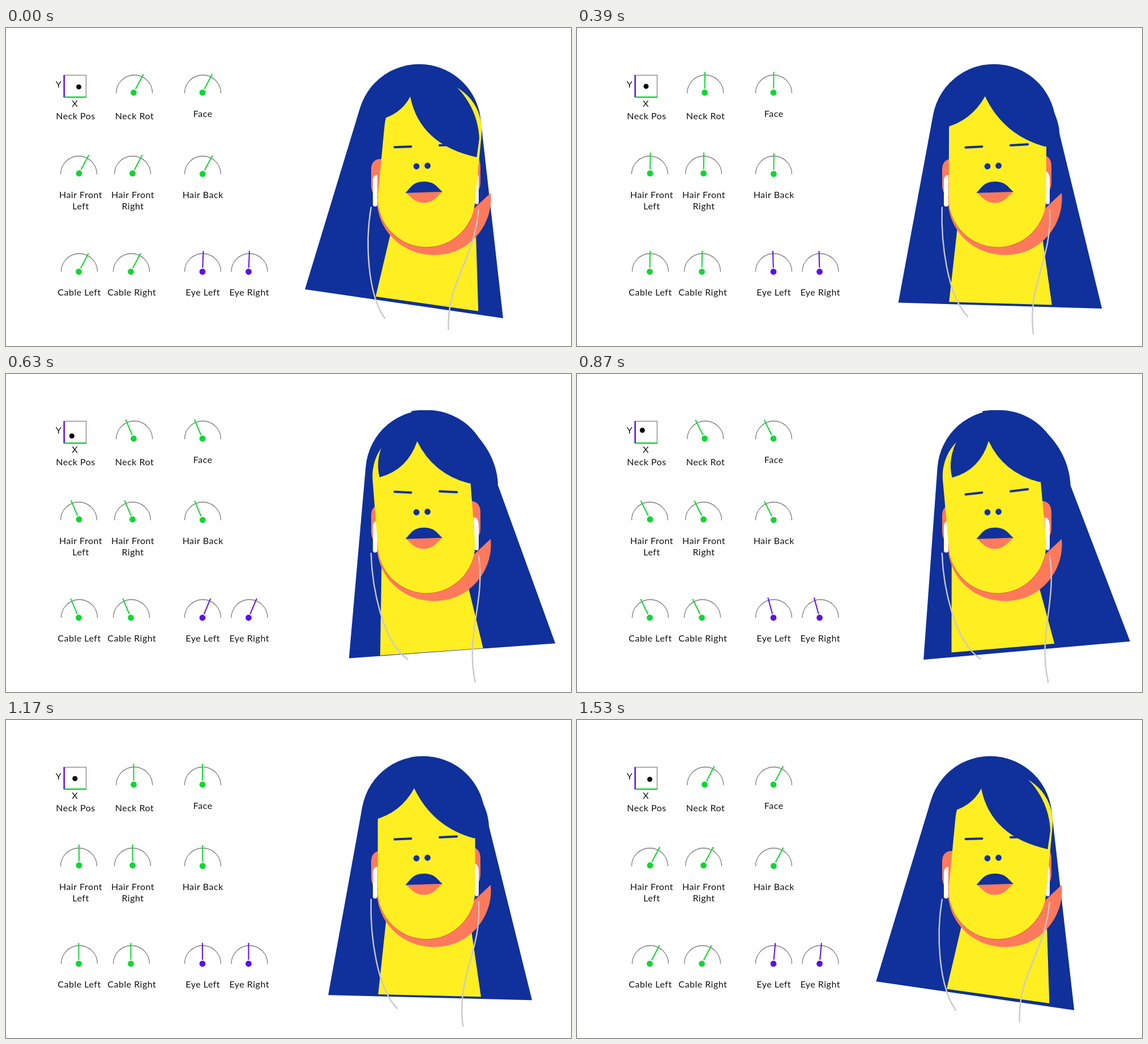
Animation, 998 px wide and 561 px high, one loop 1560 ms. Source, as an HTML page with a canvas:

```html
<!DOCTYPE html>
<html lang="en">
<head>
<meta charset="utf-8">
<title>Character rig</title>
<style>
  html, body { margin: 0; width: 100%; height: 100%; overflow: hidden; background: #fff; }
  canvas { display: block; }
</style>
</head>
<body>
<canvas id="stage" width="998" height="561"></canvas>
<script>
const ctx = document.getElementById('stage').getContext('2d');
const LOOP = 1560, STEP = 30;
const BLUE = '#10309b', YELLOW = '#ffee22', CORAL = '#ff7a5c';
const GREEN = '#10d631', PURPLE = '#5b10e8', GREY = '#7c7c7c', CABLE = '#c9c9c9';

let turn = 1; // head pose: 1 = leaning right, -1 = leaning left
let nod = 0;  // neck height and eyelids

// Smooth value through three poses: turn = 1, 0, -1
const mix = (a, b, c) => b + (a - c) / 2 * turn + ((a + c) / 2 - b) * turn * turn;
const pose = (ax, ay, bx, by, cx, cy) => [mix(ax, bx, cx), mix(ay, by, cy)];

function fill(color, path) {
  ctx.fillStyle = color;
  path ? ctx.fill(path) : ctx.fill();
}

function stroke(color, width) {
  ctx.strokeStyle = color;
  ctx.lineWidth = width;
  ctx.stroke();
}

function line(x1, y1, x2, y2, color, width) {
  ctx.beginPath();
  ctx.moveTo(x1, y1);
  ctx.lineTo(x2, y2);
  stroke(color, width);
}

function dot(x, y, r, color) {
  ctx.beginPath();
  ctx.arc(x, y, r, 0, Math.PI * 2);
  fill(color);
}

const jaw = new Path2D('M856 291C862 345 820 400.5 757 400.5C700 400.5 655 358 655 300L742 300L826 319Z');
const ears = new Path2D('M670 231H661Q645 232 645 250V279Q646 296 660 299H670Z' +
  'M812 224H820C833 224 838 233 838 243V272Q838 285 831 290H812Z');
const buds = new Path2D('M656 259C651 259 648 263 648 270V311Q648 315 652 315Q656 315 656 311Z' +
  'M826 253C832 253 835 259 835 267V307Q835 311 831.5 311Q828 311 828 307Z');
const upperLip = new Path2D('M705.5 291C714 283 718 271 738 271C758 271 761 281 771 289Z');
const lowerLip = new Path2D('M705.5 290.5C714 295 720 308.5 738 308.5C756 308.5 762 295 771 289Z');

const gauges = [
  // arc x, arc y, pivot x, pivot y
  [226.7, 115, 225.5, 114], [347.5, 115, 347, 114],
  [128.5, 258, 129, 256.5], [223.5, 258, 223.5, 256.5], [347.5, 258, 347.3, 257.5],
  [129.5, 430, 128.5, 430], [221.5, 430, 220.5, 430],
  [347.5, 430, 347, 430, true], [430, 430, 428.5, 430, true]
];

const labels = [
  ['Y', 93, 105], ['X', 121.7, 138.5], ['Neck Pos', 123, 161], ['Neck Rot', 227, 161], ['Face', 347.7, 157.3],
  ['Hair Front', 132, 300], ['Left', 132, 319.5], ['Hair Front', 224, 300], ['Right', 224, 319.5],
  ['Hair Back', 347.7, 300],
  ['Cable Left', 129.5, 472], ['Cable Right', 222.3, 472], ['Eye Left', 347.7, 472], ['Eye Right', 429.7, 472]
];

function drawPanel() {
  ctx.font = '16px Lato, sans-serif';
  ctx.letterSpacing = '0.5px';
  ctx.textAlign = 'center';
  ctx.fillStyle = '#111';
  for (const [text, x, y] of labels) ctx.fillText(text, x, y);

  ctx.strokeStyle = GREY;
  ctx.lineWidth = 1.2;
  ctx.strokeRect(102.5, 83.3, 39, 39);
  line(102.7, 83, 102.7, 122, PURPLE, 2.5);
  line(103.5, 122, 141.8, 122, GREEN, 2.5);
  dot(121.8 + 6.8 * turn, 103.3 + 6.2 * nod, 4.5, '#000');

  for (const [ax, ay, px, py, isEye] of gauges) {
    const angle = (isEye ? 24 * nod : 28 * turn) * Math.PI / 180;
    const color = isEye ? PURPLE : GREEN;
    const dx = Math.sin(angle), dy = -Math.cos(angle);
    ctx.beginPath();
    ctx.arc(ax, ay, 32, Math.PI, 0);
    stroke(GREY, 1.3);
    line(px + 7 * dx, py + 7 * dy, px + 36.8 * dx, py + 36.8 * dy, color, 2);
    dot(px, py, 5.4, color);
  }
}

// Dome joined to the two lower corners by tangents
function drawBackHair() {
  const [cx, cy] = pose(729.8, 173, 736.8, 173, 746.3, 173), r = 109.3;
  const left = pose(528, 461, 569, 485.3, 615, 505);
  const right = pose(878, 512, 929, 494.3, 980, 470);
  const tangent = ([x, y], side) =>
    Math.atan2(y - cy, x - cx) + side * Math.acos(r / Math.hypot(x - cx, y - cy));
  ctx.beginPath();
  ctx.moveTo(...left);
  ctx.arc(cx, cy, r, tangent(left, 1), tangent(right, -1));
  ctx.lineTo(...right);
  fill(BLUE);
}

function drawNeck() {
  const lift = 4.2 * nod;
  ctx.beginPath();
  ctx.moveTo(674 + 13 * turn, 330);
  ctx.lineTo(816 + 13 * turn, 330);
  ctx.lineTo(839 - 4.7 * turn, 488.4 + 10.6 * turn + lift);
  ctx.lineTo(657.4 - 4.4 * turn, 484 - 10.6 * turn + lift);
  fill(YELLOW);
}

function drawFace() {
  ctx.save();
  ctx.translate(742.7, 300.5);
  ctx.rotate(5.5 * turn * Math.PI / 180);
  ctx.beginPath();
  ctx.arc(0, 0, 86, 0.35, Math.PI - 0.35);
  stroke('#b9603c', 1.4);
  ctx.beginPath();
  ctx.arc(0, 0, 86, 0, Math.PI);
  ctx.arc(0, -121, 86, Math.PI, 0);
  fill(YELLOW);
  ctx.restore();

  ctx.lineCap = 'round';
  line(686.5, 210.6 - 3 * nod, 715.5, 209.2, BLUE, 4);
  line(766, 207, 796.3, 205.4 + 3.2 * nod, BLUE, 4);
  ctx.lineCap = 'butt';
  dot(725, 244, 5.4, BLUE);
  dot(744.6, 243, 5.4, BLUE);
  fill(CORAL, lowerLip);
  fill(BLUE, upperLip);
}

function drawFrontHair() {
  const part = pose(714, 121, 721, 120.5, 727.5, 118);

  const [x, y] = pose(655, 163, 650, 176, 664, 183);
  ctx.beginPath();
  ctx.moveTo(...part);
  ctx.quadraticCurveTo(...pose(697, 154, 697, 164, 713, 170), x, y);
  ctx.quadraticCurveTo(x - 9, y - 34, x + 12, y - 72);
  ctx.lineTo(716, 75);
  ctx.lineTo(740, 75);
  fill(BLUE);

  ctx.beginPath();
  ctx.moveTo(716, 65.5);
  ctx.bezierCurveTo(...pose(765, 68, 775, 56, 790, 52), ...pose(832, 115, 853, 125, 868, 112),
    ...pose(836, 195, 853, 190, 873, 196));
  ctx.lineTo(...pose(831.5, 228, 827, 208.8, 814.5, 189));
  ctx.quadraticCurveTo(...pose(731, 206, 754, 189, 752, 173), ...part);
  fill(BLUE);
}

function drawCables() {
  ctx.lineCap = 'round';
  ctx.beginPath();
  ctx.moveTo(644.8, 316.5);
  ctx.bezierCurveTo(...pose(634, 380, 643, 380, 647, 375), ...pose(639, 470, 655, 473, 667, 472),
    ...pose(669, 512, 690.8, 508.7, 714, 502));
  ctx.moveTo(834.8, 320.5);
  ctx.bezierCurveTo(...pose(827, 410, 841, 405, 848, 400), ...pose(778, 450, 795, 455, 815, 460),
    ...pose(781.5, 532, 807, 540, 834, 544));
  stroke(CABLE, 2.4);
  ctx.lineCap = 'butt';
}

function frame() {
  const time = Math.floor(performance.now() % LOOP / STEP) * STEP;
  const phase = (time * 1.0096 - 12) / LOOP * Math.PI * 2;
  turn = Math.cos(phase);
  nod = -Math.sin(2 * phase);

  ctx.fillStyle = '#fff';
  ctx.fillRect(0, 0, 998, 561);
  drawPanel();
  drawBackHair();
  drawNeck();
  fill(CORAL, jaw);
  fill(CORAL, ears);
  fill('#fff', buds);
  drawFace();
  drawFrontHair();
  drawCables();
  requestAnimationFrame(frame);
}
frame();
</script>
</body>
</html>
```
